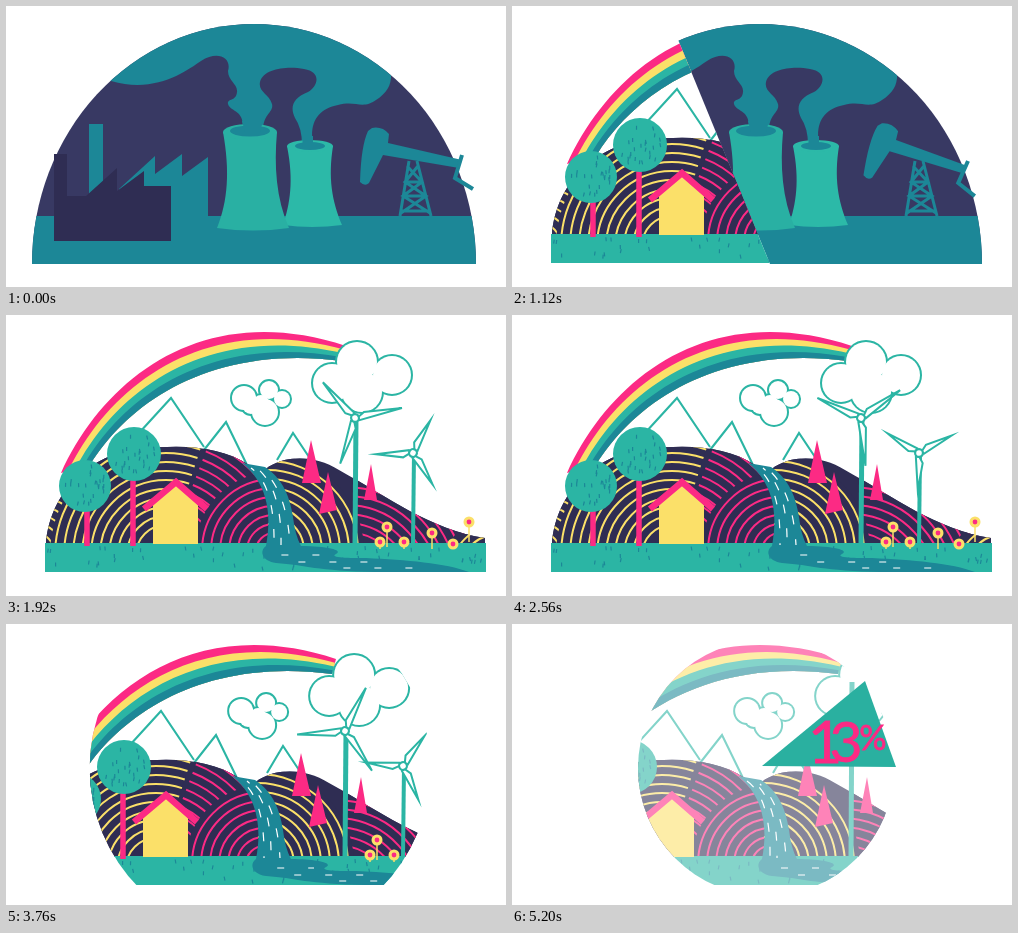
An HTML page with a canvas for the animation above (5280 ms loop, 500 by 281 pixels).

```html
<!DOCTYPE html>
<html lang="en">
<head>
<meta charset="utf-8">
<title>Clean energy</title>
<style>
html, body { margin: 0; width: 100%; height: 100%; overflow: hidden; background: #fff; }
canvas { display: block; }
</style>
</head>
<body>
<canvas id="stage" width="500" height="281"></canvas>
<script>
const c = document.getElementById('stage').getContext('2d');
const LOOP = 5280, STEP = 80, TAU = Math.PI * 2, DEG = Math.PI / 180;
const NAVY = '#383963', DARK = '#2f2d53', TEAL = '#1c8797', GREEN = '#2bb5a4',
      PINK = '#fc2a84', YELLOW = '#fbe069', WHITE = '#fff';

const ramp = (t, a, b) => Math.min(1, Math.max(0, (t - a) / (b - a)));
const smooth = u => u * u * (3 - 2 * u);
const mix = (a, b, u) => a + (b - a) * u;

function seeded(seed) {
  return () => (seed = (seed * 16807) % 2147483647) / 2147483647;
}

function fill(color, path) {
  c.fillStyle = color;
  c.fill(new Path2D(path));
}

function line(color, width, path) {
  c.strokeStyle = color;
  c.lineWidth = width;
  c.stroke(new Path2D(path));
}

function disc(x, y, r, color, ry = r) {
  c.beginPath();
  c.ellipse(x, y, r, ry, 0, 0, TAU);
  c.fillStyle = color;
  c.fill();
}

function layer(draw) {
  c.save();
  draw();
  c.restore();
}

// ---------- Industrial scene ----------
const DOME = new Path2D('M26 258A222 240 0 0 1 470 258Z');

function pump(t) {
  line(TEAL, 3, 'M403 155L394 210M411 155L425 210M399 176H416M397 190H420M395 205H424' +
    'M401 160L416 176L397 190L424 207M412 160L399 176L420 190L395 207');
  layer(() => {
    c.translate(407, 152);
    c.rotate(3.5 * DEG * (1 - Math.cos(TAU * t / 2240)));
    c.translate(-407, -152);
    fill(TEAL, 'M366 122Q376 120 383 128L382 137L456 154L453 162L377 149Q370 163 363 177' +
      'Q359 181 354 176Q355 140 362 125Z');
    line(TEAL, 4, 'M456 149L449 172L467 183');
  });
}

function industry(t) {
  c.fillStyle = NAVY;
  c.fill(DOME);
  layer(() => {
    c.clip(DOME);
    fill(TEAL, 'M80 0V65L105 75C150 88 180 65 195 55C212 44 226 52 222 65C222 75 232 78 231 86' +
      'C230 96 221 92 222 98C224 106 240 104 236 124L257 124C257 108 268 106 266 98' +
      'C263 88 252 86 254 76C258 62 282 60 298 63C316 66 312 80 302 86' +
      'C286 92 284 102 289 112Q296 122 296 139L307 139C303 116 312 103 332 99' +
      'C350 94 356 104 370 94C382 86 386 78 385 65L400 0Z');
    fill(TEAL, 'M0 210H500V258H0Z');
  });
  fill(TEAL, 'M83 118H97V200H83ZM113 183L149 150V168L176 148V170L202 151V212H113Z');
  fill(DARK, 'M48 235V148H61V190H80L111 162V185L138 165V180H165V235Z');
  fill('#2cb9a8', 'M281 140C288 175 284 198 277 219Q306 223 336 219C326 195 322 172 327 140Z');
  disc(304, 140, 23, '#2cb9a8', 6);
  disc(304, 140, 15, TEAL, 4);
  fill('#29b0a3', 'M217 126C224 165 222 195 211 222Q247 227 283 222C270 192 268 160 271 126Z');
  disc(244, 126, 27, '#29b0a3', 8);
  disc(244, 125, 20, TEAL, 5.5);
  fill(TEAL, 'M236 115H257L254 126H239ZM296 130H307V141H297Z');
  pump(t);
}

// ---------- Green scene ----------
const HILLS = new Path2D('M40 229C43 185 75 140 135 134C175 129 215 131 243 150L258 155' +
  'C280 139 308 140 333 155C382 182 425 215 479 223V229Z');

function rainbow() {
  const outer = [55, 158, 100, 60, 200, -15, 340, 31];
  const inner = [84, 150, 122, 88, 205, 29, 336, 46];
  [PINK, YELLOW, GREEN, TEAL].forEach((color, k) => {
    const p = outer.map((v, i) => mix(v, inner[i], k / 4));
    const [a, b, d, e, f, g, h, i] = inner;
    fill(color, `M${p[0]} ${p[1]}C${p.slice(2)}L${h} ${i}C${f} ${g} ${d} ${e} ${a} ${b}Z`);
  });
}

function cloud(dx, puffs) {
  c.strokeStyle = GREEN;
  c.lineWidth = 4;
  for (const [x, y, r] of puffs) {
    c.beginPath();
    c.arc(x + dx, y, r - 1, 0, TAU);
    c.stroke();
  }
  for (const [x, y, r] of puffs) disc(x + dx, y, r - 1, WHITE);
}

function furrows(color, x, y, r0, r1, from, to) {
  c.beginPath();
  c.moveTo(x, y);
  c.arc(x, y, r1 + 4, from * DEG, to * DEG);
  c.fillStyle = DARK;
  c.fill();
  c.strokeStyle = color;
  c.lineWidth = 2;
  for (let r = r0; r <= r1; r += 9) {
    c.beginPath();
    c.arc(x, y, r, from * DEG, to * DEG);
    c.stroke();
  }
}

function hills() {
  layer(() => {
    c.clip(HILLS);
    c.fillStyle = DARK;
    c.fillRect(0, 100, 500, 150);
    furrows(YELLOW, 25, 240, 24, 78, 290, 360);
    furrows(YELLOW, 160, 240, 30, 112, 180, 288);
    furrows(PINK, 160, 240, 48, 120, 291, 340);
    furrows(PINK, 268, 236, 18, 75, 180, 300);
    furrows(PINK, 340, 275, 40, 130, 275, 360);
    furrows(YELLOW, 262, 236, 18, 92, 270, 360);
    furrows(YELLOW, 490, 255, 26, 50, 180, 270);
  });
}

function ticks(seed, count, place) {
  const rand = seeded(seed);
  let path = '';
  for (let i = 0; i < count; i++) {
    const [x, y] = place(rand);
    path += `M${x} ${y}l${rand() * 2 - 1} 4`;
  }
  line(TEAL, 1.2, path);
}

function tree(x, y, r, trunk, seed) {
  line(PINK, 5.5, `M${trunk} ${y + 10}V231`);
  disc(x, y, r, GREEN);
  ticks(seed, 24, rand => {
    const a = rand() * TAU, d = Math.sqrt(rand()) * (r - 5);
    return [x + d * Math.cos(a), y + d * Math.sin(a) - 2];
  });
}

function house() {
  fill(YELLOW, 'M147 229V190L170 168L192 190V229Z');
  line(PINK, 6.5, 'M138 194L170 167L201 194');
}

function water(t) {
  fill(TEAL, 'M236 148L259 152C277 164 284 182 287 202Q289 220 295 231' +
    'C320 231 338 235 330 239C322 243 345 243 360 243C400 245 440 248 463 257H370' +
    'C310 256 300 250 270 248C256 246 253 236 260 231C267 195 259 166 236 148Z');
  layer(() => {
    c.setLineDash([9, 15]);
    c.lineDashOffset = -t * 0.06;
    line(WHITE, 1.2, 'M245 153Q269 170 268 230');
    c.lineDashOffset -= 9;
    line(WHITE, 1.2, 'M251 153Q276 174 275 230');
    c.lineDashOffset -= 8;
    line(WHITE, 1.2, 'M258 156Q281 178 284 230');
    c.setLineDash([7, 24]);
    c.lineDashOffset = -t * 0.02;
    line(WHITE, 1.2, 'M268 240H318M285 247H380M330 253H425');
  });
}

function turbine(x, y, length, angle, blades, poleTop, poleWidth) {
  line(GREEN, poleWidth, `M${x + 1} ${poleTop}L${x} 229`);
  if (blades <= 0) return;
  layer(() => {
    c.translate(x, y);
    c.scale(blades, blades);
    c.rotate(angle * DEG);
    const blade = `M3 0L10 -4L${length} 0L4 3Z`;
    for (let i = 0; i < 3; i++) {
      fill(WHITE, blade);
      line(GREEN, 2, blade);
      c.rotate(TAU / 3);
    }
    disc(0, 0, 5, GREEN);
    disc(0, 0, 2.8, WHITE);
  });
}

function flowers() {
  for (const [x, y] of [[381, 212], [374, 227], [398, 227], [426, 218], [447, 229], [463, 207]]) {
    line(YELLOW, 1.5, `M${x} ${y}V${Math.min(y + 20, 234)}`);
    disc(x, y, 5.5, YELLOW);
    disc(x, y, 2.4, PINK);
  }
}

function nature(t, grow) {
  const drift = 0.0047 * (Math.min(t, 3440) - 1920);
  c.fillStyle = WHITE;
  c.fillRect(0, 0, 500, 281);
  line(GREEN, 2.1, 'M133 118L165 83L198 132M198 135L220 107L241 150M271 145L287 118L303 142');
  rainbow();
  cloud(drift, [[326, 68, 20], [351, 47, 21], [386, 60, 20], [356, 77, 21]]);
  cloud(drift, [[238, 83, 13], [263, 75, 10], [259, 97, 14], [276, 84, 9], [245, 90, 10], [255, 88, 9]]);
  hills();
  fill(GREEN, 'M39 228H480V257H39Z');
  ticks(77, 60, rand => [42 + rand() * 434, 231 + rand() * 21]);
  water(t);
  fill(PINK, 'M305 125L315 168H296ZM322 157L331 195L313 199ZM365 149L371 185H358Z');
  tree(79, 171, 26, 81, 11);
  tree(128, 139, 27, 127, 29);
  house();
  turbine(407, 138, 37, -62 - 0.322 * (t - 1920), 1 - grow, 138, 4);
  turbine(349, 103, 48, -12 - 0.224 * (t - 1920), 1 - grow, 103 - 49 * grow, 5);
  flowers();
}

// ---------- Banner ----------
function letter(text, size, x, y) {
  c.font = `${size}px Lato, "Open Sans", sans-serif`;
  c.fillText(text, x, y);
  c.strokeText(text, x, y);
}

function banner(grow) {
  c.translate(338, 108);
  c.rotate((1 - grow) * -1.2);
  c.scale(grow, grow);
  c.translate(-338, -108);
  fill('#2ab0a0', 'M250 142L353 57L384 143Z');
  c.fillStyle = c.strokeStyle = PINK;
  c.lineWidth = 0.8;
  c.textAlign = 'center';
  letter('1', 59, 313, 139);
  letter('3', 57, 334, 138);
  letter('%', 34, 361, 126);
}

// ---------- Timeline ----------
function draw(t) {
  const wipe = smooth(ramp(t, 720, 1680));
  const shrink = ramp(t, 3440, 3920);
  const shift = ramp(t, 3440, 3760);
  const fade = ramp(t, 4400, 4880);
  const grow = smooth(ramp(t, 4480, 4960));

  c.fillStyle = WHITE;
  c.fillRect(0, 0, 500, 281);
  if (wipe < 1) industry(t);
  if (wipe > 0) layer(() => {
    c.beginPath();
    if (wipe < 1) {
      c.moveTo(258, 258);
      c.arc(258, 258, 400, Math.PI, Math.PI * (1 + wipe));
    } else if (shrink > 0) {
      c.arc(254, 144, mix(255, 128, shrink), 0, TAU);
    } else {
      c.rect(0, 0, 500, 281);
    }
    c.clip();
    c.translate(-10 * shift, 4 * shift);
    nature(t, grow);
  });
  if (fade > 0) {
    c.fillStyle = `rgba(255,255,255,${0.42 * fade})`;
    c.fillRect(0, 0, 500, 281);
  }
  if (grow > 0) layer(() => banner(grow));
}

const start = performance.now();
function tick() {
  const t = (performance.now() - start) % LOOP;
  draw(Math.floor(t / STEP) * STEP);
  requestAnimationFrame(tick);
}
tick();
</script>
</body>
</html>
```
